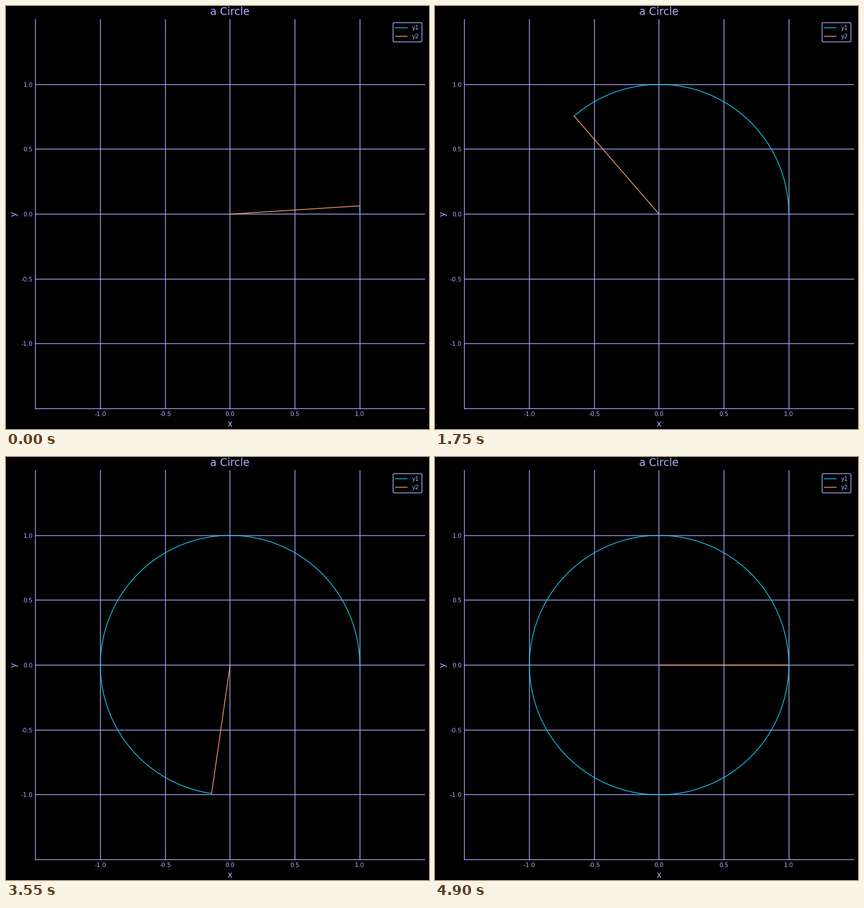
These frames come from a looping animation (748 px wide and 748 px high, 4.95 s). A matplotlib script:

```python
import numpy as np
import matplotlib.pyplot as plt
from matplotlib.animation import FuncAnimation

SIZE, DPI = 748, 96
STEPS = 99
FG, BG = "#acacff", "black"
CYAN, SALMON = "#12cdf4", "#ffa07a"
LEFT, RIGHT, TOP, BOTTOM = 52.2, 740.3, 23.9, 712.1
LIMIT = 1.5

plt.rcParams["font.family"] = "DejaVu Sans"
fig = plt.figure(figsize=(SIZE / DPI, SIZE / DPI), dpi=DPI, facecolor=BG)

# Full-figure layer in pixel coordinates for the grid and the axis lines
page = fig.add_axes([0, 0, 1, 1], zorder=-1)
page.set(xlim=(0, SIZE), ylim=(SIZE, 0))
page.axis("off")


def rule(xs, ys):
    page.plot(xs, ys, color=FG, lw=1, snap=False)


# Each rule is centred on a pixel boundary
ticks = np.arange(-1, 1.01, 0.5)
for value in (-LIMIT, *ticks):
    part = (value + LIMIT) / (2 * LIMIT)
    x = round(LEFT + part * (RIGHT - LEFT))
    y = round(BOTTOM - part * (BOTTOM - TOP))
    rule([x, x], [TOP, BOTTOM])
    rule([LEFT, RIGHT], [y, y])

# Plot area
ax = fig.add_axes([LEFT / SIZE, 1 - BOTTOM / SIZE,
                   (RIGHT - LEFT) / SIZE, (BOTTOM - TOP) / SIZE], facecolor="none")
ax.set(xlim=(-LIMIT, LIMIT), ylim=(-LIMIT, LIMIT))
ax.spines[:].set_visible(False)
labels = [f"{t:.1f}" for t in ticks]
ax.set_xticks(ticks, labels)
ax.set_yticks(ticks, labels)
ax.tick_params(length=0, pad=3.5, labelsize=8, labelcolor=FG)
ax.set_title("a Circle", fontsize=14, color=FG, pad=6, y=1)
ax.set_xlabel("x", fontsize=11, color=FG, labelpad=4)
ax.set_ylabel("y", fontsize=11, color=FG, labelpad=4)

# Moving parts: the arc traced so far and its radius
angles = np.linspace(0, 2 * np.pi, STEPS + 1)
xs, ys = np.cos(angles), np.sin(angles)
arc, = ax.plot([], [], color=CYAN, lw=1, snap=False, label="y1")
radius, = ax.plot([], [], color=SALMON, lw=1, snap=False, label="y2")

legend = ax.legend(loc="upper right", fontsize=8, labelcolor=FG,
                   facecolor=BG, edgecolor=FG, framealpha=1)
legend.get_frame().set_linewidth(1)


def update(i):
    arc.set_data(xs[:i + 2], ys[:i + 2])
    radius.set_data([0, xs[i + 1]], [0, ys[i + 1]])
    return arc, radius


anim = FuncAnimation(fig, update, frames=STEPS, interval=50,
                     repeat=True, repeat_delay=0)
plt.show()
```
